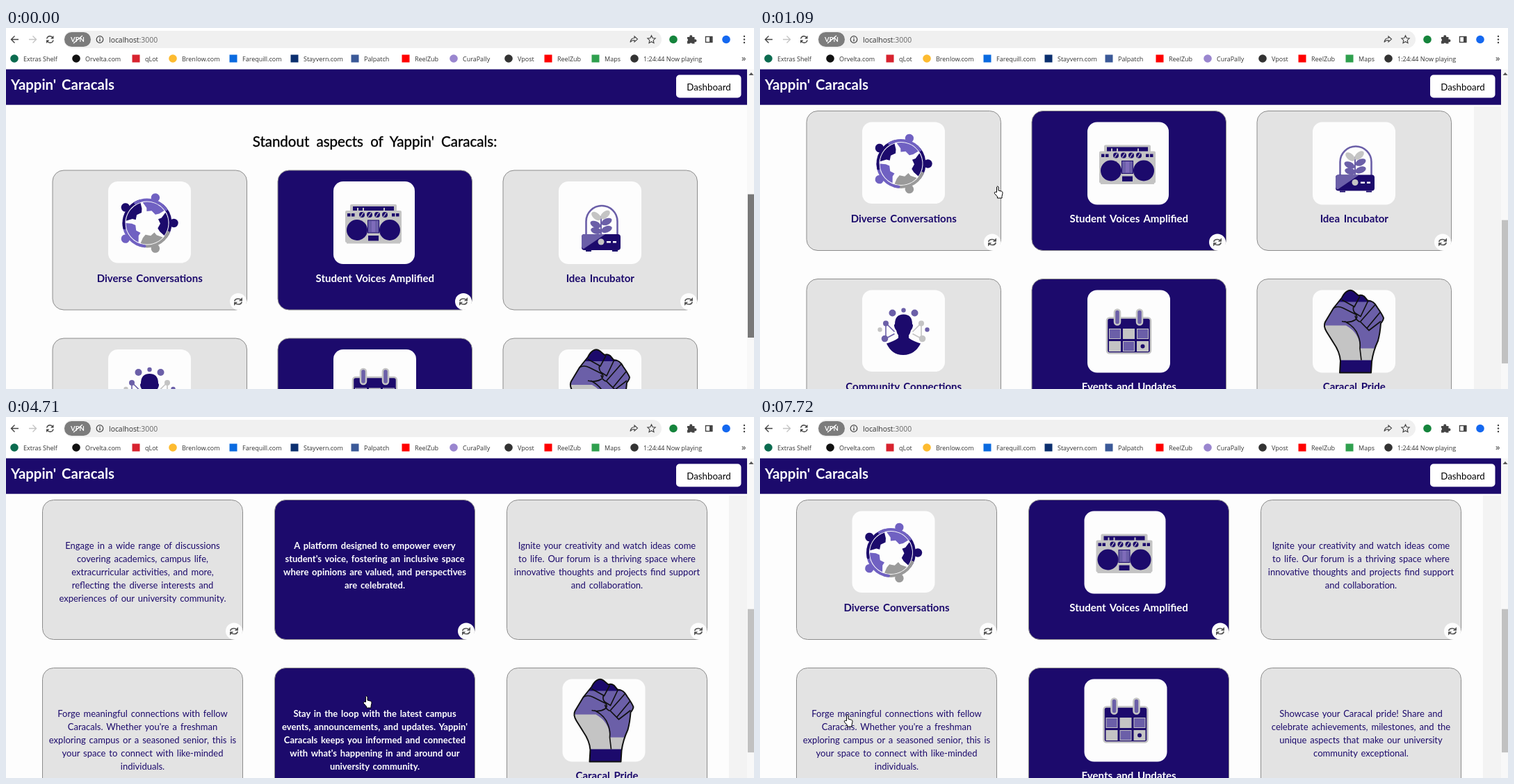
An HTML page that plays this animation: 1076x520 px, repeating every 8000 ms.

```html
<!DOCTYPE html>
<html lang="en">
<head>
<meta charset="utf-8">
<title>Yappin' Caracals</title>
<style>
html, body { margin: 0; width: 100%; height: 100%; overflow: hidden; background: #fdfdfd; }
svg { display: block; font-family: Lato, "Open Sans", sans-serif; }
.ui { font: 9px "Open Sans", "Noto Sans", sans-serif; fill: #333; }
.mid { text-anchor: middle; }
.name { font-weight: 700; font-size: 15px; word-spacing: 2px; }
.info { font-size: 13px; word-spacing: 1.6px; }
.line { fill: none; stroke: #444; stroke-width: 1.4; }
</style>
</head>
<body>
<svg id="stage" width="1076" height="520" viewBox="0 0 1076 520"></svg>
<script>
const NAVY = "#1c0a6c", PURPLE = "#6b5fa8", VIOLET = "#7061c2", GREY = "#c4c4c4", DARK = "#9a9a9a";
const LOOP = 8000;

const rect = (x, y, w, h, fill, r = 0, more = "") =>
  `<rect x="${x}" y="${y}" width="${w}" height="${h}" rx="${r}" fill="${fill}" ${more}/>`;
const dot = (x, y, r, fill, more = "") => `<circle cx="${x}" cy="${y}" r="${r}" fill="${fill}" ${more}/>`;
const path = (d, fill, more = "") => `<path d="${d}" fill="${fill}" ${more}/>`;
const stroke = (d, color, w, more = "") => path(d, "none", `stroke="${color}" stroke-width="${w}" ${more}`);
const text = (x, y, s, more = "") => `<text x="${x}" y="${y}" ${more}>${s}</text>`;

// Card pictures, each drawn in a box of 119 by 119
function ring() {
  const pt = (r, deg) => [r * Math.cos(deg * Math.PI / 180), r * Math.sin(deg * Math.PI / 180)].map(v => v.toFixed(2));
  const arc = (r, a, b) => `M${pt(r, a)}A${r} ${r} 0 0 1 ${pt(r, b)}`;
  const body = arc(30.5, -30, 36) + `L${pt(22, 34)} ${pt(17, 26)} ${pt(19, 2)} ${pt(17, -20)} ${pt(22, -20)}z`;
  return [NAVY, DARK, VIOLET, NAVY, VIOLET].map((c, k) =>
    `<g transform="translate(56 60) rotate(${k * 72})">` + dot(38.5, 0, 6.2, c) +
    stroke(arc(33.5, -48, 36), c, 4, 'stroke-linecap="round"') + path(body, c) + "</g>").join("");
}

function boombox() {
  return rect(24, 33, 67, 12, GREY, 2) + rect(28, 36, 59, 7, NAVY) +
    [34, 42, 72].map(x => rect(x, 38, 2, 5, GREY)).join("") +
    rect(17, 42, 81, 46, GREY, 2) + rect(19, 87, 77, 2.5, GREY) +
    [20, 26, 84, 90].map(x => rect(x, 46, 4.5, 4.5, NAVY)).join("") +
    [41, 52, 63, 74].map(x => dot(x, 48, 4, NAVY) + stroke(`M${x - 2} 51l4-6`, GREY, 1.3)).join("") +
    dot(34, 70, 15, NAVY) + dot(81, 70, 15, NAVY) +
    rect(49.5, 56, 16, 18, PURPLE, 0, `stroke="${NAVY}"`) + rect(55, 57, 5, 16, "#7f6cba") +
    rect(50, 78, 15, 7.5, NAVY);
}

function incubator() {
  const leaf = (x, y, a, c) => `<ellipse rx="8" ry="4.6" fill="${c}" transform="translate(${x} ${y}) rotate(${a})"/>`;
  return stroke("M39.5 77V57.5a22.5 22.5 0 0 1 45 0V77", PURPLE, 2.6) +
    stroke("M61 76V50", PURPLE, 2) +
    leaf(54, 50, 40, GREY) + leaf(67, 48, -40, GREY) + leaf(69, 58, -25, PURPLE) +
    leaf(53, 62, 25, PURPLE) + leaf(69, 69, -20, PURPLE) + leaf(54, 71, 15, PURPLE) +
    rect(33, 76, 56, 23, NAVY, 4) + path("M37 76H67L36 97q-3-1-3-4V80q0-4 4-4z", PURPLE) +
    dot(61, 87, 4.5, GREY) + rect(69, 86, 6, 2.5, "#fff") + rect(78, 86, 5, 2.5, "#fff") +
    rect(39, 99, 8, 2, NAVY) + rect(77, 99, 8, 2, NAVY);
}

function network() {
  const side = (m, c, tip) => `<g transform="translate(59.5 0) scale(${m} 1)">` +
    stroke("M25.5 48V70M25 48L13 60M26 70L13 63", c, 1.6) +
    dot(25.5, 48, 4, c) + dot(34, 57, 3.2, tip) + dot(27, 70, 4.8, c) + dot(16, 33, 5, PURPLE) + "</g>";
  return side(-1, PURPLE, GREY) + side(1, GREY, PURPLE) + dot(59.5, 29, 3.2, PURPLE) +
    path("M47 49Q47 35 59.500 35T72 49q2 1 0 6-1 2-2 3-1 5-3 7v4q5 4 17 8-8 16-24.500 16.500T35 77q12-4 17-8v-4q-2-2-3-7-1-1-2-3-2-5 0-6z", NAVY);
}

function calendar() {
  const cells = [PURPLE, GREY, PURPLE, GREY, PURPLE, GREY];
  return rect(28, 40, 63, 51, NAVY, 4, `stroke="${GREY}" stroke-width="2.5"`) +
    cells.map((c, i) => rect(31.5 + i % 3 * 20, 56 + (i > 2) * 18, 16, 14, c, 0, `stroke="${GREY}"`)).join("") +
    dot(79.5, 81, 3, NAVY) +
    [43, 75].map(x => rect(x - 4, 28, 8, 22, PURPLE, 4, `stroke="${GREY}" stroke-width="2.5"`)).join("");
}

function fist() {
  const shape = "M39 119L40 102Q39 89 30 76L20 60Q15 52 18 46L30 26 42 11Q46 3 51 1q4-2 8 1l7 6q4-2 8 1l5 6q9 0 14 10 7 10 9 15 0 3-4 8-1 14-4 25-7 15-9 30l-1 16z";
  return `<clipPath id="hand"><path d="${shape}"/></clipPath><g clip-path="url(#hand)">` +
    rect(0, 0, 119, 119, PURPLE) + rect(0, 0, 119, 17, NAVY) +
    path("M0 51H48Q68 62 68 84H119V102H0z", GREY) + rect(0, 101, 119, 18, NAVY) + "</g>" +
    stroke(shape, "#111", 2, 'stroke-linejoin="round"') +
    stroke("M30 26q6-4 14 0l18 9q4 4-1 8-8 5-19 2M42 14l18 10 8-15M59 23q-2 6 2 10l8 5 11-23M61 37q2 8 8 9l12 12 17-13M69 45l21-24M78 55l19-23M46 45q16 8 20 22 3 8 2 17l2 17", "#111", 1.7);
}

const lines = s => s.split("|");
const cards = [
  { name: "Diverse Conversations", art: ring, flips: [1500, 6480],
    info: lines("Engage in a wide range of discussions|covering academics, campus life,|extracurricular activities, and more,|reflecting the diverse interests and|experiences of our university community.") },
  { name: "Student Voices Amplified", art: boombox, flips: [2310, 6890],
    info: lines("A platform designed to empower every|student's voice, fostering an inclusive space|where opinions are valued, and perspectives|are celebrated.") },
  { name: "Idea Incubator", art: incubator, flips: [3270],
    info: lines("Ignite your creativity and watch ideas come|to life. Our forum is a thriving space where|innovative thoughts and projects find support|and collaboration.") },
  { name: "Community Connections", art: network, flips: [4120],
    info: lines("Forge meaningful connections with fellow|Caracals. Whether you're a freshman|exploring campus or a seasoned senior, this is|your space to connect with like-minded|individuals.") },
  { name: "Events and Updates", art: calendar, flips: [4710, 7600],
    info: lines("Stay in the loop with the latest campus|events, announcements, and updates. Yappin'|Caracals keeps you informed and connected|with what's happening in and around our|university community.") },
  { name: "Caracal Pride", art: fist, flips: [5330],
    info: lines("Showcase your Caracal pride! Share and|celebrate achievements, milestones, and the|unique aspects that make our university|community exceptional.") }
];

function cardMarkup(card, i) {
  const blue = i % 3 === 1, ink = blue ? "#fff" : NAVY, w = i === 1 ? 117 : 119;
  return `<g class="card"><rect class="face" height="201" rx="16" fill="${blue ? NAVY : "#e3e3e3"}" stroke="#8c8c8c"/>
    <g class="front">${rect(80, 16, w, i % 3 ? 119 : 117.5, "#fdfdfd", 14)}
      <g transform="translate(80 16)">${card.art()}</g>
      <g class="center">${text(0, 160.5, card.name, `class="mid name" fill="${ink}"`)}</g></g>
    <g class="back center">${card.info.map((s, n) =>
      text(0, 70 + n * 19, s, `class="mid info" fill="${ink}" font-weight="${blue ? 700 : 400}"`)).join("")}</g>
    <g class="turn">${dot(0, 0, 12, "#fdfdfd")}
      ${stroke("M-5.200-.5Q-4.500-4 0-4 2.500-4 4-2.500M5.200 .5Q4.500 4 0 4-2.500 4-4 2.500", "#555", 1.7)}
      ${path("M6-6v5.200H.8zM-6 6v-5.200h5.200z", "#555")}</g></g>`;
}

// Bookmarks: text x, label, icon colour, round icon
const bookmarks = [
  [25, "Extras Shelf", "#0b6b4f", 1], [114, "Orvelta.com", "#111", 1], [200, "qLot", "#d8232f"],
  [253, "Brenlow.com", "#fdbb30", 1], [340, "Farequill.com", "#0a6ae0"], [428, "Stayvern.com", "#0b2f6f"],
  [515, "Palpatch", "#3b5998"], [588, "ReelZub", "#f00"], [657, "CuraPally", "#9a86cf", 1],
  [736, "Vpost", "#333", 1], [793, "ReelZub", "#f00"], [861, "Maps", "#2fa04e"],
  [917, "1:24:44 Now playing", "#333", 1]
];

const chrome = rect(0, 0, 1076, 59.5, "#fff") + rect(83, 4, 860, 25, "#f0f0f0", 12.5) +
  `<g class="line">
    <path d="M18 16.500H8M12.500 11.500l-5 5 5 5"/>
    <path d="M33 16.500H43M38.500 11.500l5 5-5 5" stroke="#c4c4c4"/>
    <path d="M58.700 15.500a4.600 4.600 0 0 1 8.500-1.500M68 17.500a4.600 4.600 0 0 1-8.500 1.500"/>
    <circle cx="135" cy="16.500" r="4.800" stroke-width="1.200"/><path d="M135 15.800v3.400M135 13.500v1.300"/>
    <path d="M898 20.500q1-6 6-6v-2.500l4.500 4-4.500 4v-2.500q-4 0-6 3z" stroke-width="1.100"/>
    <path d="M928.500 10.800l1.700 3.700 4 .5-3 2.700.8 4-3.500-2-3.500 2 .8-4-3-2.700 4-.5z" stroke-width="1.100"/>
    <rect x="1006.500" y="12.500" width="9" height="8"/></g>` +
  path("M68.500 11v4.500H64zM58 22v-4.500h4.500z", "#444") +
  rect(84, 6, 38, 21, "#7c7c7c", 10.5) +
  text(103, 20, "VPN", 'class="mid" font-size="9.5" font-weight="700" fill="#fff"') + stroke("M97 22l13-11", "#fff", 1.2) +
  text(148, 20.5, 'localhost<tspan fill="#666">:3000</tspan>', 'class="ui" style="font-size:10.4px"') +
  dot(960, 16.5, 5.8, "#15843c") +
  path("M980 13h3.500a2 2 0 1 1 3.600 0h3.400v3.500a2 2 0 1 1 0 3.500v2.500h-3.500a2 2 0 0 0-3.500 0H980v-3.500a2 2 0 0 0 0-3.500z", "#444") +
  rect(1012, 12, 4.5, 9, "#444") + dot(1036, 16.5, 5.8, "#1468f0") +
  [12, 16.5, 21].map(y => dot(1062, y, 1.2, "#444")).join("") +
  bookmarks.map(([x, label, color, round]) =>
    (round ? dot(x - 13, 44, 5.8, color) : rect(x - 18.5, 38.5, 11, 11, color)) +
    text(x, 47.5, label, 'class="ui"')).join("") +
  text(1058, 48, "»", 'class="ui" style="font-size:13px"');

document.getElementById("stage").innerHTML =
  rect(0, 0, 1076, 520, "#fdfdfd") + rect(0, 113, 50, 407, "#f3f3f3", 0, 'id="band"') +
  text(530.5, 0, "Standout aspects of Yappin' Caracals:",
    'id="heading" class="mid" font-size="20.5" word-spacing="5" stroke="#000" stroke-width=".35"') +
  cards.map(cardMarkup).join("") +
  rect(0, 59, 1066, 51.7, NAVY) +
  text(7, 89, "Yappin' Caracals", 'font-size="20.4" font-weight="700" word-spacing="3" fill="#fff"') +
  rect(964, 67.5, 93.5, 33, "#fff", 5) + text(1011, 90, "Dashboard", 'class="mid" font-size="13.3"') +
  rect(1066, 59.5, 10, 461, "#f8f8f8") + path("M1068.500 68l3.500-4 3.500 4z", "#555") +
  rect(1067, 0, 9, 206.5, "#787878", 0, 'id="thumb"') + chrome +
  `<g id="cursor" fill="#fff" stroke="#000" stroke-linejoin="round">
    <path id="hand-icon" d="M4.500 9.500V2q1.200-2.200 2.500 0v5l4.500 1.200q2 .6 1.500 3l-1 4.300v2.500H5.500v-2L1.500 11.500q-1-2 1-2.200z"/>
    <path id="arrow-icon" d="M.5.500v14l3.300-3 2.300 5.500 2.300-1-2.300-5.200h4.400z"/></g>`;

const $ = s => document.querySelector(s);
const set = (el, attrs) => { for (const k in attrs) el.setAttribute(k, attrs[k]); };
const show = (el, on) => set(el, { visibility: on ? "visible" : "hidden" });
const stepAt = (keys, t) => keys.filter(k => k[0] <= t).pop();

// Time, then value(s)
const scrolls = [[0, 0], [150, 24], [270, 50], [390, 71], [540, 80], [660, 85.5]];
// Time, left, top, 1 for the arrow
const pointer = [
  [810, 714, 292], [960, 520, 262], [1090, 336, 227], [1620, 425, 210], [1750, 513, 194], [1890, 534, 193],
  [2770, 665, 182], [2890, 800, 190], [3410, 694, 271, 1], [3560, 470, 335, 1], [3690, 254, 398],
  [4120, 361, 391, 1], [4270, 485, 407], [4710, 513, 401], [4870, 838, 401], [5730, 560, 300],
  [5860, 279, 226], [6610, 511, 244], [7040, 475, 461], [7190, 475, 465], [7720, 120, 428]
];

const cardEls = [...document.querySelectorAll(".card")];

function draw(t) {
  const scroll = stepAt(scrolls, t)[1], wide = t >= 1500;
  const left = wide ? 52.5 : 67, width = wide ? 288 : 279.5, pitch = wide ? 334 : 324;

  cardEls.forEach((el, i) => {
    const back = cards[i].flips.filter(f => f <= t).length % 2 === 1;
    set(el, { transform: `translate(${left + i % 3 * pitch} ${205 + (i > 2) * 242 - scroll})` });
    set(el.querySelector(".face"), { width });
    el.querySelectorAll(".center").forEach(c => set(c, { transform: `translate(${width / 2} 0)` }));
    set(el.querySelector(".turn"), { transform: `translate(${width - 12.5} 189)` });
    show(el.querySelector(".front"), !back);
    show(el.querySelector(".back"), back);
  });

  set($("#heading"), { y: 171 - scroll });
  set($("#band"), { x: wide ? 1040 : 1027 });
  show($("#band"), scroll > 0);
  set($("#thumb"), { y: 239.5 + scroll * 0.435, fill: t < 810 ? "#787878" : "#c1c1c1" });

  const p = stepAt(pointer, t);
  show($("#hand-icon"), p && !p[3]);
  show($("#arrow-icon"), p && p[3]);
  if (p) set($("#cursor"), { transform: `translate(${p[1]} ${p[2]})` });
}

const start = performance.now();
function tick() {
  draw((performance.now() - start) % LOOP);
  requestAnimationFrame(tick);
}
tick();
</script>
</body>
</html>
```
